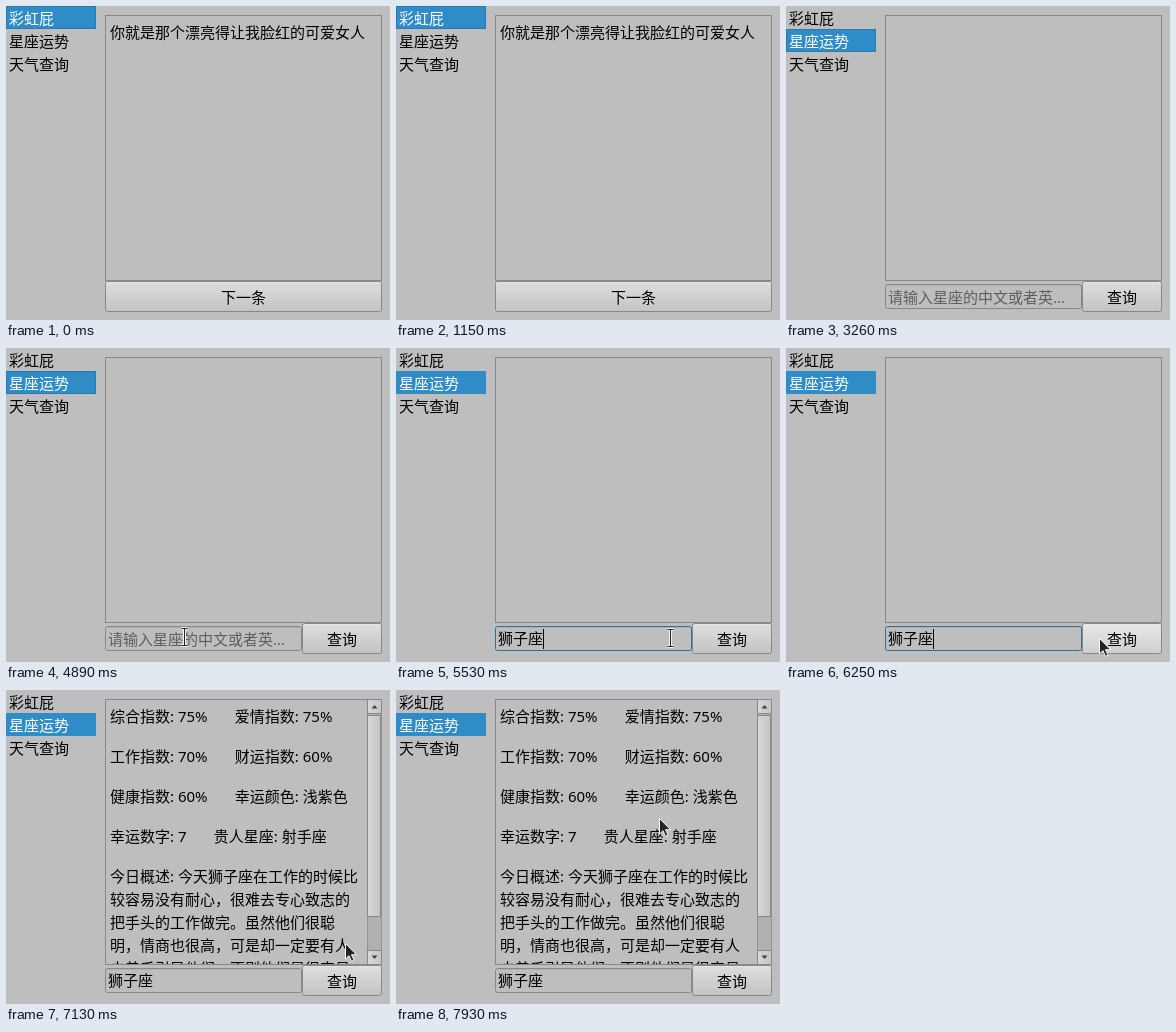
An HTML page that plays this animation: 384 px wide and 314 px high, repeating every 8 s.

```html
<!DOCTYPE html>
<html lang="zh-CN">
<head>
<meta charset="utf-8">
<title>小工具</title>
<style>
  html, body { margin: 0; width: 100%; height: 100%; overflow: hidden; background: #bebebe; }
  svg { display: block; }
  text { font: 15px "Noto Sans", "Noto Sans CJK SC", "Noto Sans CJK", sans-serif; white-space: pre; }
  .line { fill: none; stroke: #888; }
  .mid { text-anchor: middle; }
</style>
</head>
<body>
<svg width="384" height="314" viewBox="0 0 384 314">
  <defs>
    <linearGradient id="up" x2="0" y2="1"><stop stop-color="#dedede"/><stop offset="1" stop-color="#c3c3c3"/></linearGradient>
    <linearGradient id="lit" x2="0" y2="1"><stop stop-color="#e8e8e8"/><stop offset="1" stop-color="#cecece"/></linearGradient>
    <linearGradient id="bar"><stop stop-color="#d8d8d8"/><stop offset="1" stop-color="#c4c4c4"/></linearGradient>
    <clipPath id="view"><rect x="100" y="10" width="261" height="264"/></clipPath>
  </defs>
  <rect width="384" height="314" fill="#bebebe"/>

  <g id="row">
    <rect width="90" height="23" fill="#308cc6"/>
    <rect id="ring" x=".5" y=".5" width="89" height="22" fill="none" stroke="#2a7cb0"/>
  </g>
  <g id="menu"></g>

  <rect class="line" x="99.5" y="9.5" width="276" height="265"/>

  <g id="praise">
    <text x="104" y="32">你就是那个漂亮得让我脸红的可爱女人</text>
    <rect x="99.5" y="275.5" width="276" height="30" rx="2" fill="url(#up)" stroke="#888"/>
    <path d="M101 276.5H374" stroke="#e6e6e6"/>
    <text class="mid" x="237.5" y="297">下一条</text>
  </g>

  <g id="stars">
    <rect id="field" class="line" x="99.5" y="278.5" width="196" height="24" rx="2"/>
    <path d="M101 279.5H294" stroke="#b0b0b0"/>
    <text id="hint" x="102" y="297" fill="#5f5f5f">请输入星座的中文或者英…</text>
    <text id="typed" x="102" y="296">狮子座</text>
    <path id="caret" d="M147.5 281V301" stroke="#000"/>
    <rect id="button" x="296.5" y="275.5" width="79" height="30" rx="2" stroke="#888"/>
    <path d="M298 276.5H374" stroke="#e6e6e6"/>
    <text class="mid" x="336" y="297">查询</text>
    <g id="result">
      <g id="lines" clip-path="url(#view)"></g>
      <rect x="361.5" y="9.5" width="14" height="265" fill="#b0b0b0" stroke="#949494"/>
      <g fill="url(#bar)" stroke="#888">
        <rect x="361.5" y="9.5" width="14" height="14"/>
        <rect x="361.5" y="25.5" width="13" height="201"/>
        <rect x="361.5" y="260.5" width="14" height="14"/>
      </g>
      <path d="M365.500 18.500h6l-3-3.500zM365.500 265.500h6l-3 3.500z" fill="#444"/>
    </g>
  </g>

  <path id="arrow" d="M.5 .5V16L4 12.600 6.500 18.300 9 17.200 6.500 11.700H11.500Z" fill="#222" stroke="#f4f4f4"/>
  <g id="beam" fill="none">
    <path d="M-3 -8.500H3M-3 8.500H3M0 -8.500V8.500" stroke="#f4f4f4" stroke-width="3"/>
    <path d="M-3 -8.500H3M-3 8.500H3M0 -8.500V8.500" stroke="#222"/>
  </g>
</svg>
<script>
const LOOP = 8000, TICK = 80;
const $ = id => document.getElementById(id);
const show = (id, on) => { $(id).style.display = on ? '' : 'none'; };

function addText(parent, x, y, content) {
  const el = document.createElementNS('http://www.w3.org/2000/svg', 'text');
  el.setAttribute('x', x);
  el.setAttribute('y', y);
  el.textContent = content;
  $(parent).append(el);
  return el;
}

const items = ['彩虹屁', '星座运势', '天气查询'].map((s, i) => addText('menu', 3, 18 + 23 * i, s));

const gap = ' '.repeat(7);
[
  `综合指数: 75%${gap}爱情指数: 75%`,
  `工作指数: 70%${gap}财运指数: 60%`,
  `健康指数: 60%${gap}幸运颜色: 浅紫色`,
  `幸运数字: 7${gap}贵人星座: 射手座`
].forEach((s, i) => addText('lines', 104, 32 + 40 * i, s));
[
  '今日概述: 今天狮子座在工作的时候比',
  '较容易没有耐心，很难去专心致志的',
  '把手头的工作做完。虽然他们很聪',
  '明，情商也很高，可是却一定要有人',
  '去着手引导他们，否则他们是很容易'
].forEach((s, i) => addText('lines', 104, 192 + 23 * i, s));

// Pointer moves: start, end, time it leaves the stage, evenly timed points
const moves = [
  [670, 1070, 1150, [[297, 148], [222, 108], [148, 65], [160, 10]]],
  [1390, 1630, 2610, [[105, 23], [63, 34]]],
  [2610, 2930, 3260, [[90, 80], [223, 298]]],
  [4490, 4890, 4980, [[340, 300], [258, 292], [178, 289]]],
  [4980, 5220, 5290, [[178, 289], [215, 303]]],
  [5370, 5530, 5850, [[358, 297], [274, 290]]],
  [5850, 6330, 6970, [[280, 290], [320, 290]]],
  [6970, 7450, 7690, [[322, 284], [348, 238], [272, 178]]],
  [7690, 7930, LOOP, [[272, 166], [263, 128]]]
];

function pointerAt(t) {
  const move = moves.find(([start, , gone]) => t >= start && t < gone);
  if (!move) return null;
  const [start, end, , pts] = move;
  const step = Math.floor((Math.min(t, end) - start) / TICK + 0.001);
  const along = step * TICK / (end - start) * (pts.length - 1);
  const i = Math.min(Math.floor(along), pts.length - 2);
  return [0, 1].map(a => Math.round(pts[i][a] + (pts[i + 1][a] - pts[i][a]) * (along - i)));
}

function draw(t) {
  const selected = t < 2120 ? 0 : 1;
  const focused = t >= 4980 && t < 6490;
  const typed = t >= 5370;
  const pressed = t >= 6490 && t < 6570;
  const hover = t >= 6090 && t < 7050;

  $('row').setAttribute('transform', `translate(0 ${selected * 23})`);
  items.forEach((el, i) => el.setAttribute('fill', i === selected ? '#fff' : '#000'));
  show('ring', t < 4980);
  show('praise', t < 2200);
  show('stars', t >= 2200);
  show('hint', !typed);
  show('typed', typed);
  show('caret', typed && focused);
  show('result', t >= 6730);
  $('field').style.stroke = focused ? '#2f6f98' : '#888';
  $('button').setAttribute('fill', pressed ? '#b4b4b4' : hover ? 'url(#lit)' : 'url(#up)');

  const p = pointerAt(t);
  const inField = p && t >= 2200 && p[0] > 99 && p[0] < 296 && p[1] > 278 && p[1] < 304;
  show('arrow', p && !inField);
  show('beam', inField);
  if (p) {
    $('arrow').setAttribute('transform', `translate(${p[0]} ${p[1]})`);
    $('beam').setAttribute('transform', `translate(${p[0] + 0.5} ${p[1]})`);
  }
}

const begin = performance.now();
function frame() {
  draw((performance.now() - begin) % LOOP);
  requestAnimationFrame(frame);
}
frame();
</script>
</body>
</html>
```
